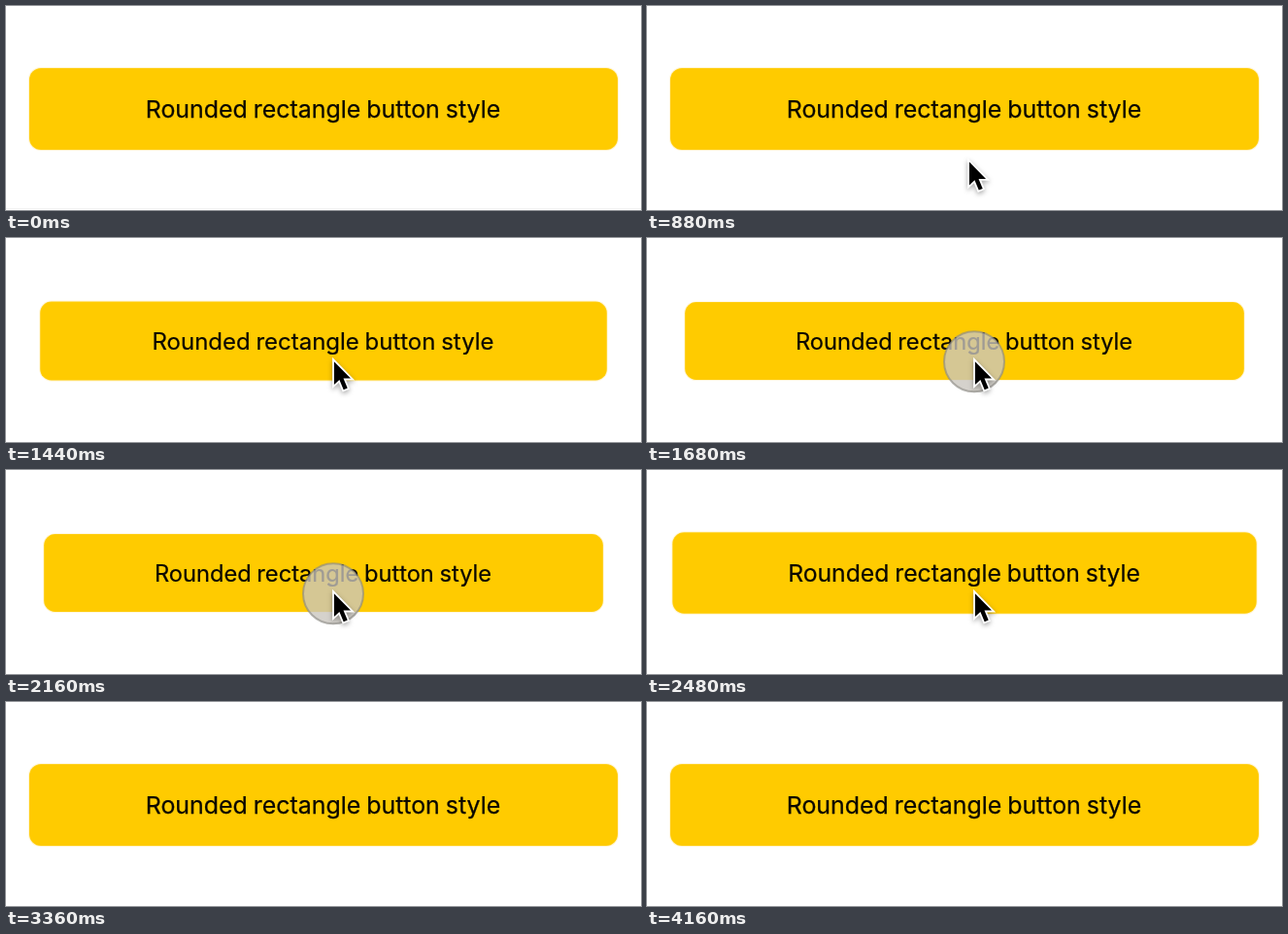
These frames come from a looping animation (654x210 px, 4.24 s). An HTML page with a canvas:

```html
<!DOCTYPE html>
<html lang="en">
<head>
<meta charset="utf-8">
<title>Rounded rectangle button style</title>
<style>
html, body { margin: 0; width: 654px; height: 210px; overflow: hidden; background: #fff; }
body { position: relative; }
#button {
  position: absolute; left: 23.5px; top: 64px; width: 606px; height: 84px;
  border-radius: 12px; background: #ffcb00; color: #0b0800;
  box-shadow: 0 0 0 1px #fff3cc;
  font: 400 24.9px/84px Inter, "Liberation Sans", sans-serif;
  font-optical-sizing: none; word-spacing: -1px;
  -webkit-text-stroke: .25px #0b0800;
  text-align: center; white-space: nowrap; user-select: none;
}
canvas { position: absolute; left: 0; top: 0; }
</style>
</head>
<body>
<div id="button">Rounded rectangle button style</div>
<canvas id="stage" width="654" height="210"></canvas>
<script>
const LOOP = 4240, STEP = 80;
const button = document.getElementById('button');
const ctx = document.getElementById('stage').getContext('2d');

const lerp = (a, b, p) => a + (b - a) * p;
const progress = (t, start, end) => Math.min(1, Math.max(0, (t - start) / (end - start)));
const easeOut = p => 1 - (1 - p) ** 2;
const easeInOut = p => p * p * (3 - 2 * p);

const ARROW = [[1.5, 3.2], [1.5, 27], [7, 21.9], [11.3, 32.2], [15.3, 30.5], [11.1, 20.6], [18.6, 20.6]];

function drawCursor(x, y, alpha) {
  if (alpha <= 0) return;
  ctx.save();
  ctx.globalAlpha = alpha;
  ctx.translate(x, y);
  ctx.beginPath();
  ARROW.forEach(([px, py]) => ctx.lineTo(px, py));
  ctx.closePath();
  ctx.lineJoin = 'miter';
  ctx.lineWidth = 3.6;
  ctx.strokeStyle = '#fff';
  ctx.shadowColor = 'rgba(0,0,0,.35)';
  ctx.shadowBlur = 5;
  ctx.shadowOffsetY = 2;
  ctx.stroke();
  ctx.shadowColor = 'transparent';
  ctx.fillStyle = '#000';
  ctx.fill();
  ctx.restore();
}

function drawTouch(radius, alpha) {
  if (alpha <= 0) return;
  ctx.save();
  ctx.globalAlpha = alpha;
  ctx.beginPath();
  ctx.arc(337, 127.3, radius, 0, Math.PI * 2);
  ctx.fillStyle = 'rgba(202,198,190,.78)';
  ctx.fill();
  ctx.lineWidth = 2;
  ctx.strokeStyle = 'rgba(140,138,132,.65)';
  ctx.stroke();
  ctx.restore();
}

function render(t) {
  const press = easeOut(progress(t, 1342, 1542));
  const release = easeOut(progress(t, 2358, 2558));
  button.style.transform = `scale(${1 - 0.05 * (press - release)})`;

  ctx.clearRect(0, 0, 654, 210);
  if (t < 640) {
    ctx.fillStyle = '#f3f3f3';
    ctx.fillRect(0, 208, 654, 1);
  }

  const lift = progress(t, 2220, 2400);
  drawTouch(lerp(31, 46, easeOut(lift)), progress(t, 1480, 1620) * (1 - lift));

  const arrive = easeInOut(progress(t, 860, 1280));
  const leave = easeInOut(progress(t, 2520, 2860));
  const shown = progress(t, 640, 800) * (1 - progress(t, 2960, 3220));
  drawCursor(
    lerp(330.4, 336.4, arrive) - 2 * leave,
    lerp(157.6, 124, arrive) + 41 * leave,
    shown
  );
}

const start = performance.now();
function tick() {
  const t = (performance.now() - start) % LOOP;
  render(Math.floor(t / STEP) * STEP);
  requestAnimationFrame(tick);
}
tick();
</script>
</body>
</html>
```
